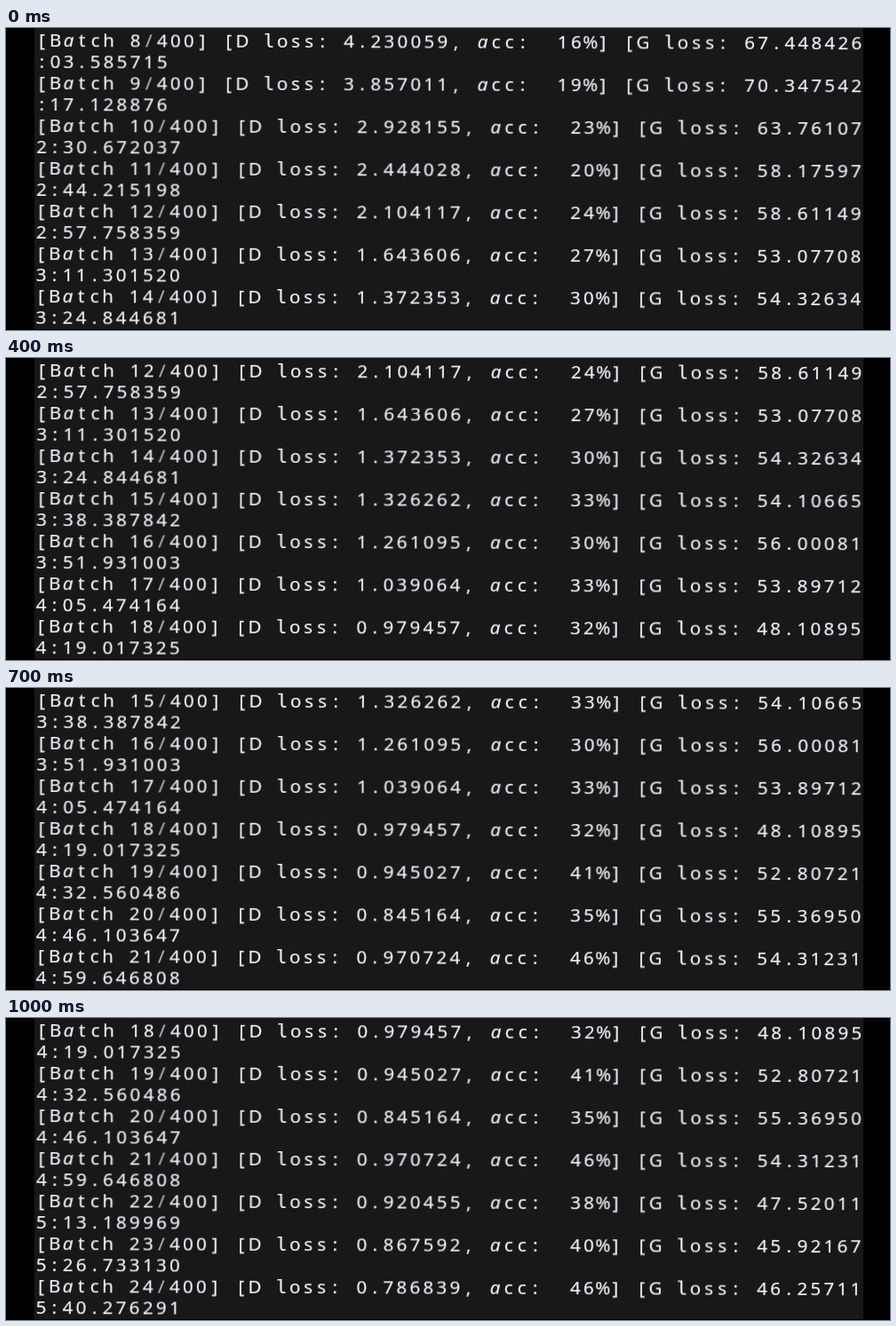
These frames come from a looping animation (995x340 px, 1100 ms). An HTML page:

```html
<!DOCTYPE html>
<html lang="en">
<head>
<meta charset="utf-8">
<title>Training log</title>
<style>
  html, body {
    margin: 0;
    width: 100%;
    height: 100%;
    overflow: hidden;
    background: #000;
  }
  .screen {
    position: absolute;
    left: 32px;
    top: 0;
    width: 933px;
    height: 339px;
    overflow: hidden;
    background: #181818;
  }
  .tilt {
    position: absolute;
    left: 1px;
    top: 1.2px;
    transform: rotate(0.2deg);
    transform-origin: 0 0;
  }
  .row {
    display: flex;
    align-items: baseline;
    height: 24px;
    font: 20.5px/24px "Noto Sans", "Open Sans", sans-serif;
    color: #f2f2fc;
    -webkit-text-stroke: 0.2px;
  }
  .row span {
    flex: none;
    width: 15.04px;
    text-align: center;
    white-space: pre;
  }
  .row .a { font-style: italic; }
  .row .l { font-family: "DejaVu Sans Mono", monospace; }
  .row .slash { color: #b4b4bc; }
</style>
</head>
<body>
<div class="screen"><div class="tilt"><div id="log"></div></div></div>
<script>
  const FIRST = 8, VISIBLE = 7, STEPS = 11, STEP_MS = 100;
  const ENTRY_H = 48, COLUMNS = 62;
  const START_S = 123.585715, BATCH_S = 13.543161;

  const log = document.getElementById("log");
  const styles = { a: "a", l: "l", "/": "slash" };

  let seed = 8;
  function noise(size) {
    seed = (seed * 16807) % 2147483647;
    return size * (2 * seed / 2147483647 - 1);
  }

  const decay = (i, from, to, rate) => to + (from - to) * Math.exp(-i / rate);

  function clock(seconds) {
    const rest = (seconds % 60).toFixed(6).padStart(9, "0");
    return `${Math.floor(seconds / 60)}:${rest}`;
  }

  function addRow(text) {
    const row = document.createElement("div");
    row.className = "row";
    for (const ch of text) {
      const cell = document.createElement("span");
      cell.textContent = ch;
      if (styles[ch]) cell.className = styles[ch];
      row.append(cell);
    }
    log.append(row);
  }

  // Losses fall and accuracy climbs; long lines wrap past the right edge.
  function addEntry(i) {
    const batch = FIRST + i;
    const dLoss = decay(i, 4.7, 0.8, 3.5) * (1 + noise(0.1));
    const acc = Math.round(20 + 1.6 * i + noise(5));
    const gLoss = decay(i, 72, 49, 5) + noise(5);
    const line = `[Batch ${batch}/400] [D loss: ${dLoss.toFixed(6)}, acc:  ${acc}%] [G loss: ${gLoss.toFixed(6)}`;
    addRow(line.slice(0, COLUMNS));
    addRow(clock(START_S + BATCH_S * i).slice(batch < 10 ? 1 : 0));
  }

  for (let i = 0; i < STEPS - 1 + VISIBLE; i++) addEntry(i);

  log.animate(
    { transform: ["translateY(0)", `translateY(${-STEPS * ENTRY_H}px)`] },
    { duration: STEPS * STEP_MS, easing: `steps(${STEPS}, end)`, iterations: Infinity }
  );
</script>
</body>
</html>
```
